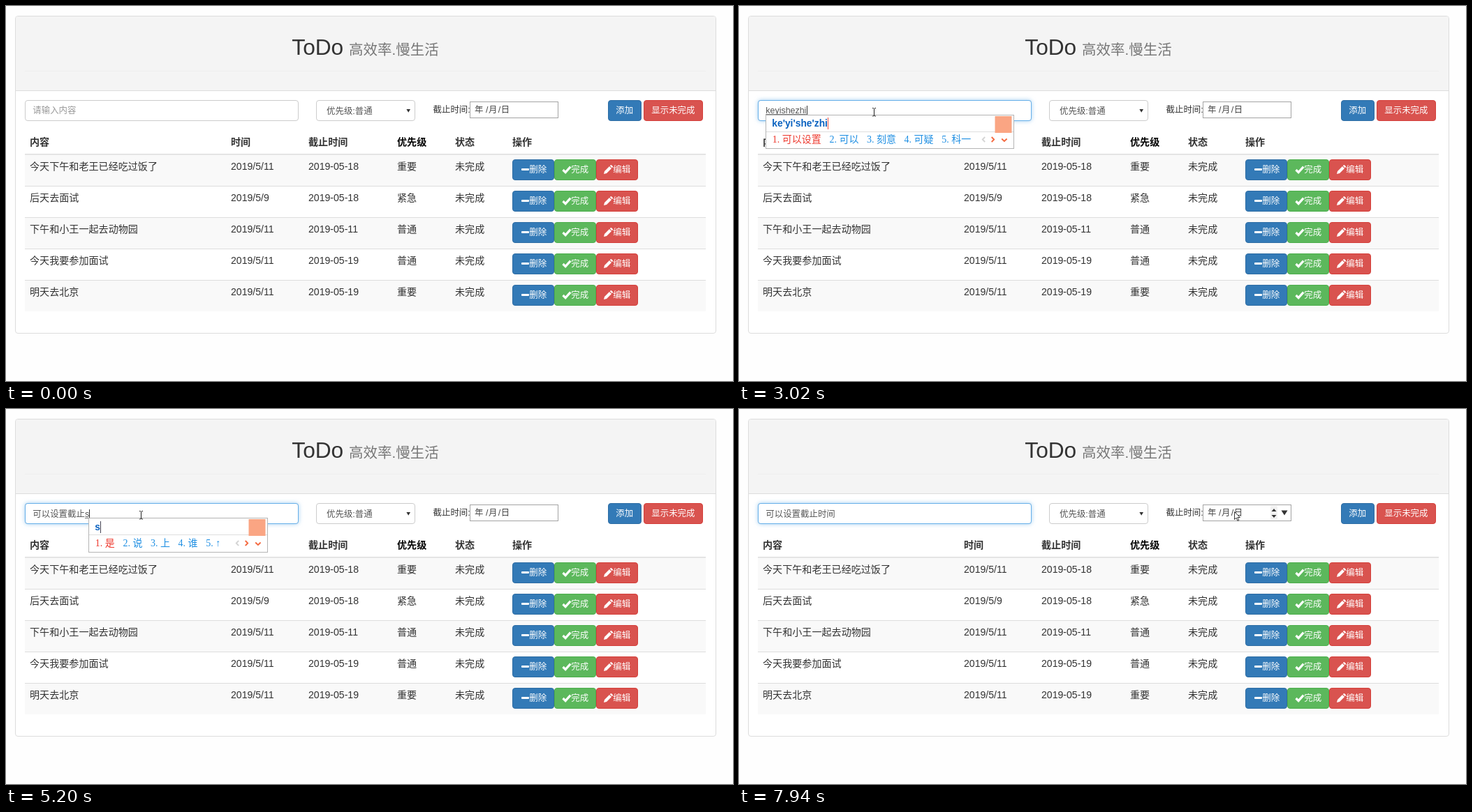
Write an HTML page that moves like this. It is 1041x538 px and loops after 8000 ms.

```html
<!DOCTYPE html>
<html lang="zh-CN">
<head>
<meta charset="utf-8">
<title>ToDo</title>
<style>
html, body { margin: 0; width: 100%; height: 100%; overflow: hidden; background: #fefefe; }
svg { display: block; width: 1041px; height: 538px; }
text { font-family: "Liberation Sans", "Noto Sans CJK SC", "Noto Sans CJK", sans-serif; white-space: pre; }
.index { font-family: "Liberation Serif", serif; }
</style>
</head>
<body>
<svg id="stage" viewBox="0 0 1041 538"><g id="page"></g><g id="live"></g></svg>
<script>
const LOOP = 8000;
const SMALL = 12.45, BODY = 14.08, PINYIN = 13.8;
const FONT = '"Liberation Sans","Noto Sans CJK SC","Noto Sans CJK",sans-serif';

const rect = (x, y, w, h, fill, extra = '') =>
  `<rect x="${x}" y="${y}" width="${w}" height="${h}" fill="${fill}" ${extra}/>`;
// Whole-pixel baselines keep the glyphs crisp.
const text = (x, y, str, size, fill, extra = '') =>
  `<text x="${x}" y="${Math.round(y)}" font-size="${size}" fill="${fill}" ${extra}>${str}</text>`;
const path = (d, fill, extra = '') => `<path d="${d}" fill="${fill}" ${extra}/>`;
const line = (x1, y, x2, color, width = 1) => rect(x1, y, x2 - x1, width, color);
const box = (x, y, w, h, fill, stroke, r = 0, extra = '') =>
  rect(x, y, w, h, fill, `stroke="${stroke}" rx="${r}" ${extra}`);

const pen = document.createElement('canvas').getContext('2d');
function widthOf(str, size, weight = 400) {
  pen.font = `${weight} ${size}px ${FONT}`;
  return pen.measureText(str).width;
}

// ---- static page ----
const BLUE = ['#337ab7', '#2e6da4'], GREEN = ['#5cb85c', '#4cae4c'], RED = ['#d9534f', '#d43f3a'];
const COLUMNS = [34, 322, 433, 560, 643];
const ROWS = [
  ['今天下午和老王已经吃过饭了', '2019/5/11', '2019-05-18', '重要'],
  ['后天去面试', '2019/5/9', '2019-05-18', '紧急'],
  ['下午和小王一起去动物园', '2019/5/11', '2019-05-11', '普通'],
  ['今天我要参加面试', '2019/5/11', '2019-05-19', '普通'],
  ['明天去北京', '2019/5/11', '2019-05-19', '重要']
];

function button(x, y, w, [fill, edge], label, labelX) {
  return box(x + .5, y + .5, w - 1, 29, fill, edge, 3.5) + text(labelX, y + 19, label, SMALL, '#fff');
}

function rowButtons(y) {
  return button(725, y, 60, BLUE, '删除', 749.3) + rect(738, y + 13, 11, 3, '#fff', 'rx="1"') +
    button(785, y, 60, GREEN, '完成', 809.3) +
    path(`M797.5 ${y + 15}l3.6 3.6 7.2 -8`, 'none', 'stroke="#fff" stroke-width="3.2"') +
    button(845, y, 60, RED, '编辑', 869.3) +
    path(`M856 ${y + 21}l1 -4 7 -7 3 3 -7 7zm8.8 -11.8l1 -1q.6 -.5 1.2 0l1.8 1.8q.5 .6 0 1.2l-1 1z`, '#fff');
}

function drawPage() {
  let s = box(13.5, 14.5, 1003, 455, '#fff', '#ddd', 3.5) +
    path('M14 121V18q0 -3 3 -3H1013q3 0 3 3V121z', '#f4f4f4') +
    line(14, 121, 1016, '#ddd') + line(27, 93, 1002, '#eee') +
    text(409.3, 70, 'ToDo', 31.68, '#333') + text(491, 70, '高效率.慢生活', 20.5, '#777') +
    box(27.5, 135.5, 391, 29, '#fff', '#ccc', 3.5) +
    box(444.5, 135.5, 141, 29, '#fff', '#ccc', 3.5) +
    text(459, 155, '优先级:普通', SMALL, '#555') + path('M573.4 148h5.6l-2.8 4.8z', '#333') +
    text(611.5, 153, '截止时间:', SMALL, '#333') +
    box(664.5, 137.5, 126, 23, '#fff', '#a4a4a4') +
    [[671, '年'], [687, '/'], [691, '月'], [704.7, '/'], [708.7, '日']]
      .map(([x, c]) => text(x, 153, c, SMALL, '#444')).join('') +
    button(862, 135, 48, BLUE, '添加', 873.3) + button(913, 135, 85, RED, '显示未完成', 924.3);
  ['内容', '时间', '截止时间', '优先级', '状态', '操作'].forEach((label, i) =>
    s += text([...COLUMNS, 725][i], 200, label, BODY, i === 3 ? '#000' : '#333', 'font-weight="700"'));
  ROWS.forEach((row, i) => {
    const y = 213 + i * 45;
    if (i % 2 === 0) s += rect(27, y, 975, 45, '#f9f9f9');
    s += i ? line(27, y, 1002, '#ddd') : line(27, y - 1, 1002, '#ddd', 1.5);
    [...row, '未完成'].forEach((cell, c) => s += text(COLUMNS[c], y + 22, cell, BODY, '#333'));
    s += rowButtons(y + 7);
  });
  return s;
}

// ---- typing: time, committed text, pinyin, candidates ----
const FIRST = '可以设置', SECOND = FIRST + '截止', WHOLE = SECOND + '时间';
const TYPING = [
  [0, '', '', ''],
  [1470, '', 'k', '看 可 开 快 卡'],
  [1620, '', 'ke', '可 课 客 克 科'],
  [1940, '', "ke'y", '可以 可用 可疑 课余 刻意'],
  [2010, '', "ke'yi", '可以 可疑 刻意 科一 可移'],
  [2410, '', "ke'yi's", '可以是 可以说 可以上 可以送 可以算'],
  [2480, '', "ke'yi'sh", '可以是 可以说 可以上 可以受 可以省'],
  [2640, '', "ke'yi'she", '可以设 可以射 可以舍 可以社 可以'],
  [2870, '', "ke'yi'she'z", '可以设置 可以 刻意 可疑 科一'],
  [2950, '', "ke'yi'she'zh", '可以设置 可以 刻意 可疑 科一'],
  [3020, '', "ke'yi'she'zhi", '可以设置 可以 刻意 可疑 科一'],
  [3410, FIRST, '', ''],
  [3640, FIRST, 'j', '就 叫 将 及 加'],
  [3720, FIRST, 'ji', '及 几 级 集 即'],
  [3870, FIRST, 'jie', '接 借 节 街 饥饿'],
  [4250, FIRST, "jie'z", '截止 借助 节奏 介质 杰作'],
  [4410, FIRST, "jie'zh", '截止 借助 价值 介质 截至'],
  [4480, FIRST, "jie'zhi", '截止 截至 戒指 介质 截止到'],
  [4880, SECOND, '', ''],
  [5200, SECOND, 's', '是 说 上 谁 ↑'],
  [5270, SECOND, 'sh', '是 说 上 谁 属'],
  [5350, SECOND, 'shi', '是 时 事 十 使'],
  [5580, SECOND, "shi'j", '时间 事件 实际 世界 视角'],
  [5670, SECOND, "shi'jia", '时间 世家 施加 实价 师家'],
  [5820, SECOND, "shi'jian", '时间 事件 实践 世间 是件'],
  [6010, WHOLE, '', '']
];
const POPUP_X = { 0: 38.5, 4: 90.5, 6: 118.5 };
const HISTORY = ['988', '今天我要参加面试', '明天去北京', '可以设置截止时间'];

function popup(committed, pinyin, candidates) {
  const x = POPUP_X[committed.length], dy = committed ? 1 : 0;
  let cx = x + 9.3, items = '';
  candidates.split(' ').forEach((word, i) => {
    const color = i ? '#1f8fe3' : '#ee3b30';
    items += text(cx, 196 + dy, i + 1 + '.', 14, color, 'class="index"') +
      text(cx + 14, 196 + dy, word, 14, color, 'font-weight="300"');
    cx += 14 + (word === '↑' ? 13 : 14 * word.length) + 11.6;
  });
  const end = cx - 11.6, w = Math.round(end + 61 - x), y = 191.5 + dy;
  const caretX = Math.round(x + 9 + widthOf(pinyin, PINYIN, 700));
  const stroke = c => `stroke="${c}" stroke-width="1.8"`;
  return box(x, 156.5, w, 48 + dy, '#fff', '#b4b4b4') + line(x + .5, 180, x + w - .5, '#dedede') +
    text(x + 8.8, 173 + dy, pinyin, PINYIN, '#0a62c0', 'font-weight="700"') +
    rect(caretX, 160 + dy, 1, 17, pinyin.length > 1 ? '#f0503c' : '#445') + items +
    path(`M${end + 20} ${y - 3.5}l-3.5 3.5 3.5 3.5`, 'none', stroke('#d4d4d4')) +
    path(`M${end + 29.5} ${y - 3.5}l3.5 3.5 -3.5 3.5`, 'none', stroke('#f4683e')) +
    path(`M${end + 44} ${y - 1}l3.7 3.5 3.7 -3.5`, 'none', stroke('#f4683e')) +
    rect(x + w - 27, 158, 24, 24, '#faa583');
}

function history() {
  return rect(27, 165, 392, 140, '#fff', 'rx="2" style="filter:drop-shadow(0 1px 1.2px rgba(0,0,0,.45))"') +
    HISTORY.map((item, i) => text(37.3, 191.9 + i * 31.7, item, 11.5, '#222')).join('');
}

function field(t) {
  const [, committed, pinyin, candidates] = TYPING.findLast(step => step[0] <= t);
  const raw = pinyin.replaceAll("'", ''), value = committed + raw;
  const focus = t < 680 ? 0 : t < 765 ? .4 : t < 850 ? .8 : 1;
  const baseline = committed ? 155 : 154;
  let s = '';
  if (focus) {
    s += box(27.5, 135.5, 391, 29, '#fff', '#ccc', 3.5) +
      box(27.5, 135.5, 391, 29, '#fff', '#66afe9', 3.5,
        `opacity="${focus}" style="filter:drop-shadow(0 0 3px rgba(102,175,233,.6))"`);
  }
  s += value ? text(38.3, baseline, value, SMALL, '#555') : text(38.3, baseline, '请输入内容', SMALL, '#999');
  const caretX = 38.5 + widthOf(value, SMALL);
  if (raw) s += line(38.3 + widthOf(committed, SMALL), baseline + 1, caretX, '#777');
  const caretOn = focus && !(t >= 1220 && t < 1470) && !(t >= 6520 && t < 7050) && t < 7550;
  if (caretOn) s += rect(Math.round(caretX), baseline - 11, 1, 14, '#333');
  if (t >= 850 && t < 1470) s += history();
  if (raw) s += popup(committed, pinyin, candidates);
  return s;
}

// ---- pointer ----
function pointerAt(t) {
  if (t < 130) return null;
  if (t < 520) {
    const p = Math.floor((t - 130) / 78) / 5, e = 1 - (1 - p) ** 2;
    return [831 - 638 * e, 476 - 324 * e];
  }
  if (t < 6920) return [193, 152];
  if (t < 7780) {
    const p = Math.min(11, Math.floor((t - 6920) / 79) + 1) / 11;
    return [193 + 590 * p * p * (3 - 2 * p), 152 + 28 * Math.sin(Math.PI * p) - 8 * p];
  }
  return t < 7860 ? [800, 144] : t < 7940 ? [692, 146] : [709, 147];
}

function pointer(t) {
  const at = pointerAt(t);
  if (!at) return '';
  const [x, y] = at.map(Math.round);
  const within = (l, top, r, b) => x > l && x < r && y > top && y < b;
  if (within(27, 135, 419, 165)) {
    return path(`M${x - 2} ${y - 5.5}h1.5l1 1 1 -1h1.5M${x + .5} ${y - 5}v10.5M${x - 2} ${y + 6}h1.5l1 -1 1 1h1.5`,
      'none', 'stroke="#222"');
  }
  const hover = within(664, 137, 791, 161)
    ? rect(761, 139, 10, 20, '#f1f1f1') +
      path('M762.5 147l3.5 -4 3.5 4zm0 5h7l-3.5 4zM776.5 145.5h9l-4.5 7z', '#333')
    : '';
  return hover + path(`M${x + .5} ${y + .5}v11l2.6 -2.4 1.9 4.4 1.8 -.8 -1.9 -4.2h3.5z`,
    '#fff', 'stroke="#222" stroke-width=".9"');
}

// ---- playback ----
const live = document.getElementById('live');
document.getElementById('page').innerHTML = drawPage();
const start = performance.now();
let shown = '';
function play() {
  const t = (performance.now() - start) % LOOP;
  const next = field(t) + pointer(t);
  if (next !== shown) live.innerHTML = shown = next;
  requestAnimationFrame(play);
}
play();
</script>
</body>
</html>
```
